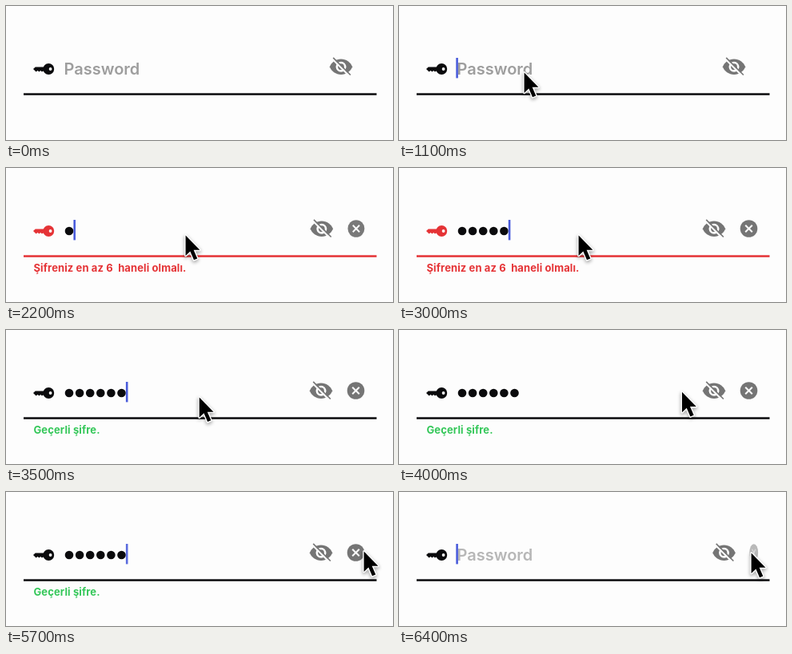
An HTML page with a canvas that plays this animation: 484x168 px, repeating every 6.5 s.

```html
<!DOCTYPE html>
<html lang="tr">
<head>
<meta charset="utf-8">
<title>Password field</title>
<style>
html, body { margin: 0; width: 100%; height: 100%; overflow: hidden; background: #fdfdfd; }
canvas { display: block; width: 484px; height: 168px; }
</style>
</head>
<body>
<canvas id="stage" width="484" height="168"></canvas>
<script>
const ctx = document.getElementById('stage').getContext('2d');
const LOOP = 6500, STEP = 100;
const BG = '#fdfdfd', BLACK = '#0b0b0d', RED = '#e53336', GREEN = '#34c759', GREY = '#757575';
const FONT = 'Inter, "Liberation Sans", sans-serif';
const TEXT_X = 72.5, DOT_PITCH = 13.1;

// moments of the story, in ms
const ENTER = 400, FOCUS = 1100, VALID = 3300, REVEAL = 4500, HIDE = 5000, CLEAR = 6300;
const TYPED = [2000, 2500, 2700, 2800, 3000, VALID];
const CARET_RESETS = [FOCUS, ...TYPED, REVEAL, HIDE + STEP, CLEAR];

const MOVES = [
  { start: 300, time: 600, x: 156, y: 82, sag: 14 },
  { start: 1600, time: 200, x: 224, y: 83, sag: 2 },
  { start: VALID, time: 1000, x: 389, y: 72, sag: 3 },
  { start: 5300, time: 400, x: 447, y: 73, sag: 9 },
  { start: 5700, time: 200, x: 440, y: 75, sag: 0 }
];

// smoothstep from 0 to 1
function ease(t, start, time) {
  const p = Math.min(1, Math.max(0, (t - start) / time));
  return p * p * (3 - 2 * p);
}

function pointerAt(t) {
  let x = 462, y = -8;
  for (const m of MOVES) {
    const p = ease(t, m.start, m.time);
    x += (m.x - x) * p;
    y += (m.y - y) * p + m.sag * Math.sin(Math.PI * p);
  }
  return [x, y];
}

function disc(x, y, r, color) {
  ctx.fillStyle = color;
  ctx.beginPath();
  ctx.arc(x, y, r, 0, 7);
  ctx.fill();
}

function line(x1, y1, x2, y2, width, color) {
  ctx.strokeStyle = color;
  ctx.lineWidth = width;
  ctx.beginPath();
  ctx.moveTo(x1, y1);
  ctx.lineTo(x2, y2);
  ctx.stroke();
}

function label(text, x, y, font, color, spacing = 0, alpha = 1) {
  ctx.globalAlpha = alpha;
  ctx.font = font + ' ' + FONT;
  ctx.letterSpacing = spacing + 'px';
  ctx.fillStyle = color;
  ctx.fillText(text, x, y);
  ctx.globalAlpha = 1;
}

function message(text, color, alpha) {
  label(text, 34.5, 129.6, '700 13px', color, 0.11, alpha);
}

const KEY = new Path2D('M34 79 L36.7 76.6 H48 V81.4 H46.6 L45 82.6 L43.2 81 L41.4 82.6 L39.6 81 L37.6 82.4 Z');
function drawKey(color) {
  ctx.fillStyle = color;
  ctx.fill(KEY);
  disc(53.3, 79, 6.9, color);
  disc(55.6, 79, 1.9, BG);
}

const EYE = new Path2D('M-11 0C-9.27-4.39-5-7.5 0-7.5S9.27-4.39 11 0C9.27 4.39 5 7.5 0 7.5S-9.27 4.39-11 0Z');
function drawEye(x, slashed) {
  ctx.save();
  ctx.translate(x, 76.2);
  ctx.scale(1.29, 1.29);
  ctx.fillStyle = GREY;
  ctx.fill(EYE);
  disc(0, 0, 5, BG);
  disc(0, 0, 3, GREY);
  if (slashed) {
    line(-9.5, -8.7, 8.7, 9.5, 1.8, BG);
    line(-7.6, -8.8, 9.2, 8, 1.3, GREY);
  }
  ctx.restore();
}

function drawClear(open) {
  if (open <= 0) return;
  ctx.save();
  ctx.globalAlpha = open;
  ctx.translate(450 - 12.5 * open, 76);
  ctx.scale(open, 1);
  disc(0, 0, 10.8, GREY);
  line(-4.3, -4.3, 4.3, 4.3, 2, BG);
  line(-4.3, 4.3, 4.3, -4.3, 2, BG);
  ctx.restore();
}

const ARROW = new Path2D('M0 0V27.2L6.2 21.4L11.2 33L15.8 31L10.8 19.6H19.2Z');
function drawPointer(x, y) {
  ctx.save();
  ctx.translate(x + 0.6, y + 1.6);
  ctx.scale(0.93, 0.93);
  ctx.lineJoin = 'round';
  ctx.strokeStyle = '#fff';
  ctx.lineWidth = 3;
  ctx.shadowColor = 'rgba(0,0,0,.4)';
  ctx.shadowBlur = 4;
  ctx.shadowOffsetY = 2;
  ctx.stroke(ARROW);
  ctx.shadowColor = 'transparent';
  ctx.fillStyle = '#000';
  ctx.fill(ARROW);
  ctx.restore();
}

// lit for 600 ms, then a short fade out and in, once a second
function drawCaret(t, x) {
  const start = CARET_RESETS.filter(r => r <= t).pop();
  if (start === undefined) return;
  const phase = (t - start) % 1000;
  ctx.globalAlpha = Math.min(1, Math.max(0, Math.abs(phase - 750) / 100 - 1.2) * 3);
  ctx.fillStyle = '#4a5cdb';
  ctx.fillRect(x - 1.2, 65, 2.6, 25.4);
  ctx.globalAlpha = 1;
}

function draw(t) {
  const count = t >= CLEAR ? 0 : TYPED.filter(s => s <= t).length;
  const revealed = t >= REVEAL && t < HIDE;
  const tint = t >= TYPED[0] && t < VALID ? RED : BLACK;
  const open = ease(t, 1950, 280) - ease(t, CLEAR, 200);

  ctx.fillStyle = BG;
  ctx.fillRect(0, 0, 484, 168);
  drawKey(tint);
  ctx.fillStyle = tint;
  ctx.fillRect(22, 109.3, 441.5, 2.5);

  let caretX = TEXT_X + count * DOT_PITCH;
  if (!count) {
    const alpha = t < CLEAR ? 1 : ease(t, CLEAR - STEP, 300);
    label('Password', TEXT_X, 86, '600 20px', '#9e9e9e', 0, alpha);
  } else if (revealed) {
    label('123456', TEXT_X, 86.2, '700 20px', BLACK, 0.2);
    caretX = 148;
  } else {
    for (let i = 0; i < count; i++) disc(79 + i * DOT_PITCH, 79, 5.3, BLACK);
  }

  message('Şifreniz en az 6  haneli olmalı.', RED, ease(t, 1950, 200) - ease(t, 3200, 200));
  message('Geçerli şifre.', GREEN, ease(t, 3250, 200) - ease(t, 6150, 250));
  drawCaret(t, caretX);
  drawEye(419 - 25 * open, !revealed);
  drawClear(open);
  if (t >= ENTER) drawPointer(...pointerAt(t));
}

function tick(now) {
  draw(Math.floor((now % LOOP) / STEP) * STEP);
  requestAnimationFrame(tick);
}
draw(0);
requestAnimationFrame(tick);
</script>
</body>
</html>
```
